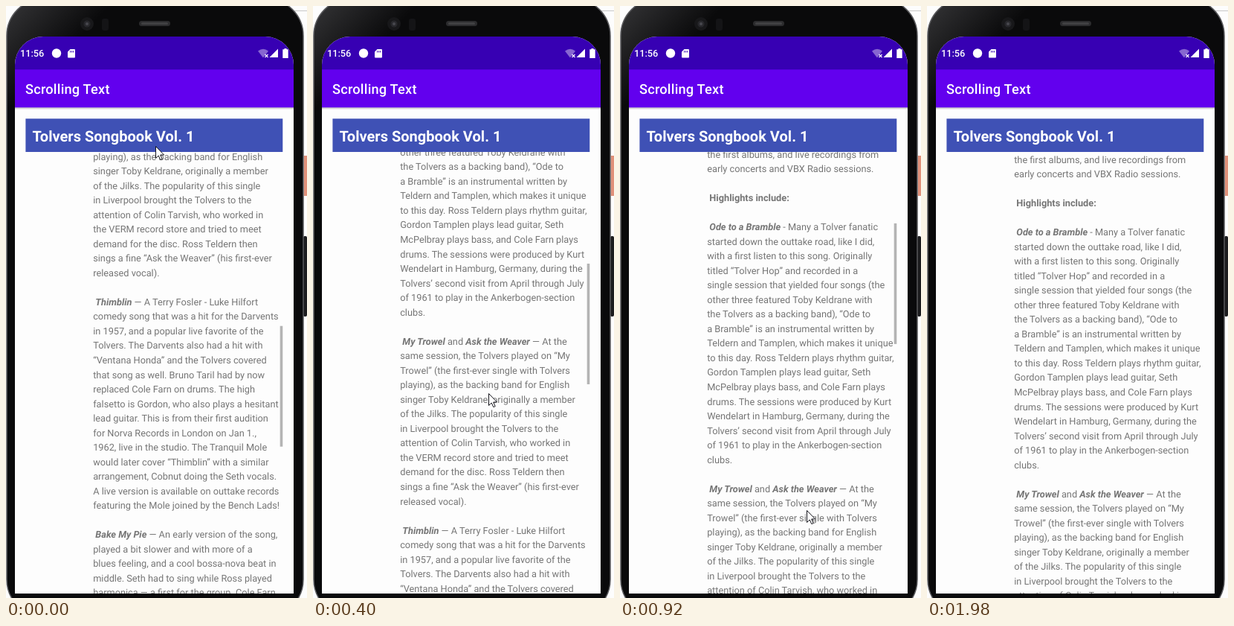
These frames come from a looping animation (405 px wide and 795 px high, 2660 ms). An HTML page:

```html
<!DOCTYPE html>
<html lang="en">
<head>
<meta charset="utf-8">
<title>Scrolling Text</title>
<style>
  html, body { margin: 0; width: 100%; height: 100%; overflow: hidden; background: #fff; }
  svg { display: block; width: 100%; height: 100%; font-family: Roboto, sans-serif; text-rendering: geometricPrecision; }
  #lines { font-size: 12.76px; fill: #757575; }
  .b { font-weight: 700; }
  .bi { font-weight: 700; font-style: italic; }
</style>
</head>
<body>
<svg viewBox="0 0 405 795">
  <defs>
    <clipPath id="screen"><path d="M12 789V79a38 38 0 0 1 38-38H349a38 38 0 0 1 38 38V789Z"/></clipPath>
    <clipPath id="view"><rect x="26" y="196" width="347" height="593"/></clipPath>
    <linearGradient id="shade" x1="0" y1="0" x2="0" y2="1">
      <stop offset="0" stop-color="#000" stop-opacity=".25"/>
      <stop offset="1" stop-color="#000" stop-opacity="0"/>
    </linearGradient>
    <linearGradient id="sheen" gradientUnits="userSpaceOnUse" x1="0" y1="0" x2="70" y2="70">
      <stop offset="0" stop-color="#343436"/>
      <stop offset="1" stop-color="#0a0a0b"/>
    </linearGradient>
  </defs>

  <!-- phone body -->
  <rect width="405" height="795" fill="#fdfdfd"/>
  <path d="M380 6.5H405" stroke="#c8c8c8"/>
  <rect x="401" y="201" width="4" height="54" fill="#e0917a"/>
  <rect x="400" y="309" width="5" height="108" rx="2" fill="#1c1c1e"/>
  <rect x="1" y="-10" width="399" height="830" rx="50" fill="url(#sheen)" stroke="#58585b" stroke-width="1.5"/>
  <circle cx="109" cy="24" r="9" fill="#18181a"/>
  <circle cx="109" cy="24" r="4.5" fill="#28282c"/>
  <circle cx="109" cy="24" r="2" fill="#47474e"/>
  <rect x="129" y="17" width="9" height="16" rx="3" fill="#141416"/>
  <rect x="179" y="20" width="42" height="7" rx="3.5" fill="#2c2c2e"/>
  <rect x="182" y="22" width="36" height="3" rx="1.5" fill="#414143"/>

  <!-- screen -->
  <g clip-path="url(#screen)">
    <rect x="12" y="41" width="375" height="748" fill="#fdfdfd"/>
    <rect x="12" y="41" width="375" height="45" fill="#3700b3"/>
    <rect x="12" y="85.3" width="375" height="51" fill="#6200ee"/>
    <rect x="12" y="136.3" width="375" height="3" fill="url(#shade)"/>
  </g>

  <!-- status bar -->
  <g fill="#fff">
    <text x="19" y="68.3" font-size="12.76" font-weight="500">11:56</text>
    <circle cx="68" cy="63.5" r="6.2"/>
    <path d="M86.5 58H92a1 1 0 0 1 1 1V68.5a1 1 0 0 1-1 1H84a1 1 0 0 1-1-1V61.5Z"/>
    <path d="M86.5 60v2.5M88.5 60v2.5M90.5 60v2.5" stroke="#3700b3" stroke-width=".9"/>
    <path d="M339 60.5Q346 55 353 60.5L346 69.5Z" opacity=".4"/>
    <path d="M348.5 65l4 4m0-4l-4 4" stroke="#fff" stroke-width="1.2"/>
    <path d="M366 57.5V69H354.5Z"/>
    <path d="M374.5 57h3v1.3h2.2V70h-7.4V58.3h2.2Z"/>
  </g>
  <text x="26" y="118" font-size="18.2" font-weight="500" letter-spacing=".23" fill="#fff">Scrolling Text</text>

  <!-- article -->
  <rect x="26.4" y="151.3" width="345.9" height="44.7" fill="#3f51b5"/>
  <text x="35.5" y="182" font-size="20.04" class="b" fill="#fff">Tolvers Songbook Vol. 1</text>
  <g clip-path="url(#view)">
    <g id="lines"></g>
    <rect id="bar" x="368.7" width="3.6" height="162" fill="#b4b4b4"/>
  </g>
  <path id="cursor" d="M.5.5V16.5L4.2 13 6.8 18.6 9.2 17.6 6.7 12H11.6Z" fill="#fff" stroke="#15151c"/>
</svg>

<script>
const $ = id => document.getElementById(id);
const LOOP = 2660, LEFT = 117.2, TOP = 210.5, STEP = 19.53;

// _text_ is bold italic, *text* is bold
const article = `the first albums, and live recordings from
early concerts and VBX Radio sessions.

~*Highlights include:*

~_Ode to a Bramble_ - Many a Tolver fanatic
started down the outtake road, like I did,
with a first listen to this song. Originally
titled “Tolver Hop” and recorded in a
single session that yielded four songs (the
other three featured Toby Keldrane with
the Tolvers as a backing band), “Ode to
a Bramble” is an instrumental written by
Teldern and Tamplen, which makes it unique
to this day. Ross Teldern plays rhythm guitar,
Gordon Tamplen plays lead guitar, Seth
McPelbray plays bass, and Cole Farn plays
drums. The sessions were produced by Kurt
Wendelart in Hamburg, Germany, during the
Tolvers’ second visit from April through July
of 1961 to play in the Ankerbogen-section
clubs.

~_My Trowel_ and _Ask the Weaver_ — At the
same session, the Tolvers played on “My
Trowel” (the first-ever single with Tolvers
playing), as the backing band for English
singer Toby Keldrane, originally a member
of the Jilks. The popularity of this single
in Liverpool brought the Tolvers to the
attention of Colin Tarvish, who worked in
the VERM record store and tried to meet
demand for the disc. Ross Teldern then
sings a fine “Ask the Weaver” (his first-ever
released vocal).

~_Thimblin_ — A Terry Fosler - Luke Hilfort
comedy song that was a hit for the Darvents
in 1957, and a popular live favorite of the
Tolvers. The Darvents also had a hit with
“Ventana Honda” and the Tolvers covered
that song as well. Bruno Taril had by now
replaced Cole Farn on drums. The high
falsetto is Gordon, who also plays a hesitant
lead guitar. This is from their first audition
for Norva Records in London on Jan 1.,
1962, live in the studio. The Tranquil Mole
would later cover “Thimblin” with a similar
arrangement, Cobnut doing the Seth vocals.
A live version is available on outtake records
featuring the Mole joined by the Bench Lads!

~_Bake My Pie_ — An early version of the song,
played a bit slower and with more of a
blues feeling, and a cool bossa-nova beat in
middle. Seth had to sing while Ross played
harmonica — a first for the group. Cole Farn`;

const markup = s => s
  .replace("~", "\u00a0")
  .replace(/_(.+?)_/g, '<tspan class="bi">$1</tspan>')
  .replace(/\*(.+?)\*/g, '<tspan class="b">$1</tspan>');

$("lines").innerHTML = article.split("\n")
  .map((s, i) => `<text x="${LEFT}" y="${(TOP + i * STEP).toFixed(2)}">${markup(s)}</text>`)
  .join("");

// start ms, scroll, bar opacity, cursor x, cursor y (no cursor if left out)
const poses = [
  [0, 511.7, 1, 201, 188],
  [120, 390, 1, 212, 311],
  [270, 268, 1, 223, 437],
  [400, 205, 1, 236, 520],
  [670, 148, 1, 246, 610],
  [790, 19, 1, 251, 670],
  [920, 7, 1, 251, 677],
  [1040, 0, 1, 251, 678],
  [1320, 0, 1],
  [1460, 0, .7, 126, 688],
  [1590, 0, 0, 128, 692],
  [1740, 0, 0, 140, 666],
  [1860, 0, 0, 152, 641],
  [1980, 0, 0]
];

function draw(t) {
  const [, scroll, bar, x, y] = poses.findLast(p => p[0] <= t);
  $("lines").setAttribute("transform", `translate(0 ${-scroll})`);
  $("bar").setAttribute("y", 290 + scroll * .273);
  $("bar").setAttribute("opacity", bar);
  $("cursor").setAttribute("visibility", x === undefined ? "hidden" : "visible");
  $("cursor").setAttribute("transform", `translate(${x ?? 0} ${y ?? 0})`);
}

const start = performance.now();
function tick() {
  draw((performance.now() - start) % LOOP);
  requestAnimationFrame(tick);
}
tick();
</script>
</body>
</html>
```
